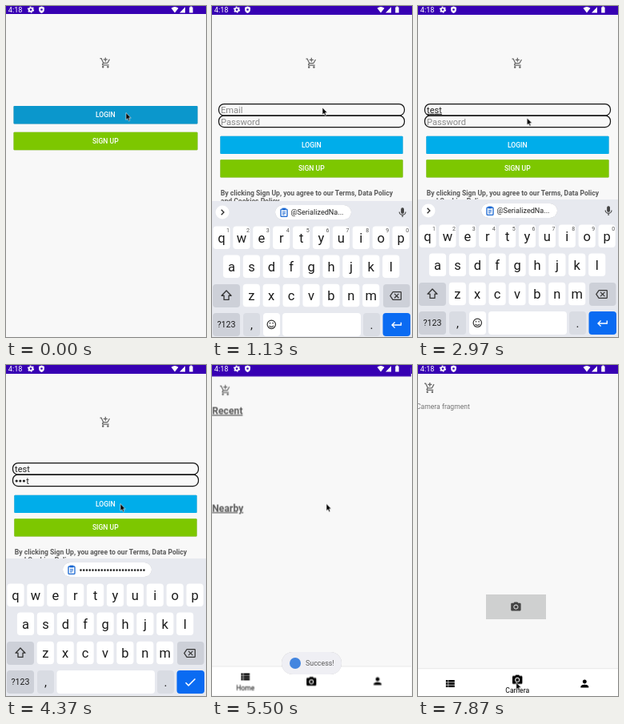
Recreate the animation shown at these times as an HTML page. Size 250 by 414 pixels, loop 8 s.

```html
<!DOCTYPE html>
<html lang="en">
<head>
<meta charset="utf-8">
<title>Shopping app login</title>
<style>
html, body { margin: 0; width: 100%; height: 100%; overflow: hidden; background: #f8f8f8; }
svg { display: block; width: 100%; height: 100%; }
text { font-family: Roboto, "Open Sans", sans-serif; white-space: pre; }
.mid { text-anchor: middle; }
.btn { font-size: 8.6px; font-weight: 500; fill: #fff; text-anchor: middle; }
.field { fill: none; stroke: #111; stroke-width: 1.2; }
.input { font-size: 11.1px; fill: #222; }
.hint { fill: #8a8a8a; }
.bold { font-weight: 700; fill: #5a5a5a; }
.small { font-size: 8.6px; }
.head { font-size: 12.4px; text-decoration: underline; }
.lift { filter: drop-shadow(0 .6px .6px #0004); }

/* one loop = 8 s, so 1% = 80 ms */
.run, .step { animation: 8s linear infinite; }
.step { animation-timing-function: step-end; }

.login { animation-name: openLogin, fadeLogin; transform-origin: 125px 207px; }
.home { animation-name: openHome, fadeHome; transform-origin: 125px 207px; }
@keyframes openLogin {
  0%, .19% { transform: scale(.85); animation-timing-function: linear(0, .4 16.7%, .73 24%, .86 32%, .95 50%, .985 70%, 1); }
  5.19%, 100% { transform: none; }
}
@keyframes fadeLogin { 0%, .4% { opacity: 0; } 1.1%, 100% { opacity: 1; } }
@keyframes openHome {
  0%, 66.87% { transform: scale(.85); animation-timing-function: linear(0, .4 16.7%, .73 24%, .86 32%, .95 50%, .985 70%, 1); }
  71.87%, 100% { transform: none; }
}
@keyframes fadeHome { 0%, 67.3% { opacity: 0; } 67.9%, 100% { opacity: 1; } }

.press { animation-name: press; }
@keyframes press { 0%, 61.2% { fill: #00adea; } 63%, 100% { fill: #0b97cc; } }

.keyboard { animation-name: keyboard; }
@keyframes keyboard {
  0%, 11.2% { transform: translateY(174px); animation-timing-function: ease-out; }
  14.4%, 66% { transform: none; animation-timing-function: ease-in; }
  67.8%, 100% { transform: translateY(174px); }
}
.kText { animation-name: kText; }
.kPass { animation-name: kPass; }
@keyframes kText { 0% { visibility: visible; } 40%, 100% { visibility: hidden; } }
@keyframes kPass { 0% { visibility: hidden; } 40%, 100% { visibility: visible; } }

.hintE { animation-name: hintE; }
.hintP { animation-name: hintP; }
@keyframes hintE { 0% { visibility: visible; } 22.5%, 100% { visibility: hidden; } }
@keyframes hintP { 0% { visibility: visible; } 43.7%, 100% { visibility: hidden; } }

.e1, .e2, .e3, .e4 { text-decoration: underline; }
.e1 { animation-name: e1, line; }
.e2 { animation-name: e2, line; }
.e3 { animation-name: e3, line; }
.e4 { animation-name: e4, line; }
@keyframes e1 { 0% { visibility: hidden; } 22.5%, 100% { visibility: visible; } }
@keyframes e2 { 0% { visibility: hidden; } 24.4%, 100% { visibility: visible; } }
@keyframes e3 { 0% { visibility: hidden; } 26.3%, 100% { visibility: visible; } }
@keyframes e4 { 0% { visibility: hidden; } 28.7%, 100% { visibility: visible; } }
@keyframes line { 0% { text-decoration-line: underline; } 39.5%, 100% { text-decoration-line: none; } }

.last { animation-name: last; }
@keyframes last {
  0% { visibility: hidden; transform: none; }
  43.7% { visibility: visible; transform: none; }
  45.6% { visibility: visible; transform: translateX(4.6px); }
  47.5% { visibility: visible; transform: translateX(9.2px); }
  50%, 100% { visibility: visible; transform: translateX(13.8px); }
}
.d1 { animation-name: d1; }
.d2 { animation-name: d2; }
.d3 { animation-name: d3; }
@keyframes d1 { 0% { visibility: hidden; } 45.6%, 100% { visibility: visible; } }
@keyframes d2 { 0% { visibility: hidden; } 47.5%, 100% { visibility: visible; } }
@keyframes d3 { 0% { visibility: hidden; } 50%, 100% { visibility: visible; } }

.tabA { animation-name: tabA; }
.tabB { animation-name: tabB; }
@keyframes tabA { 0% { visibility: visible; } 90%, 100% { visibility: hidden; } }
@keyframes tabB { 0% { visibility: hidden; } 90%, 100% { visibility: visible; } }
.sink { animation-name: sink; }
.rise { animation-name: rise; }
@keyframes sink { 0%, 90% { transform: none; } 91.4%, 100% { transform: translateY(5.5px); } }
@keyframes rise { 0%, 90% { transform: translateY(5.5px); } 91.4%, 100% { transform: none; } }

.toast { animation-name: toast; }
@keyframes toast { 0%, 66.6% { opacity: 0; } 68.1%, 91.9% { opacity: 1; } 93.7%, 100% { opacity: 0; } }

.pointer { animation-name: pointer; }
@keyframes pointer {
  0%, 5% { transform: translate(150px, 133.5px); animation-timing-function: ease-in-out; }
  9%, 31.5% { transform: translate(138px, 127px); animation-timing-function: ease-in-out; }
  36.5%, 51% { transform: translate(136.3px, 140px); animation-timing-function: ease-in-out; }
  54%, 73.4% { transform: translate(143px, 173.5px); animation-timing-function: ease-in-out; }
  79.1%, 83.4% { transform: translate(117.5px, 390px); }
  84.6%, 87.1% { transform: translate(117.5px, 403px); animation-timing-function: ease-out; }
  89.5%, 100% { transform: translate(122.7px, 397px); }
}
</style>
</head>
<body>
<svg viewBox="0 0 250 414" preserveAspectRatio="none">
  <defs>
    <path id="cart" transform="scale(.62) translate(-11.5 -11.5)" d="M11 9h2V6h3V4h-3V1h-2v3H8v2h3v3zm-4 9c-1.1 0-2 .9-2 2s.9 2 2 2 2-.9 2-2-.9-2-2-2zm10 0c-1.1 0-2 .9-2 2s.9 2 2 2 2-.9 2-2-.9-2-2-2zm-9.83-3.25l.03-.12.9-1.63h7.45c.75 0 1.41-.41 1.75-1.03l3.86-7.01L19.42 4h-.01l-1.1 2-2.76 5H8.53l-.13-.27L6.16 6l-.95-2-.94-2H1v2h2l3.6 7.59-1.35 2.45c-.16.28-.25.61-.25.96 0 1.1.9 2 2 2h12v-2H7.42c-.13 0-.25-.11-.25-.25z"/>
    <g id="camera" transform="scale(.62) translate(-12 -11)">
      <circle cx="12" cy="12" r="3.2"/>
      <path d="M9 2L7.17 4H4c-1.1 0-2 .9-2 2v12c0 1.1.9 2 2 2h16c1.1 0 2-.9 2-2V6c0-1.1-.9-2-2-2h-3.17L15 2H9zm3 15c-2.76 0-5-2.24-5-5s2.24-5 5-5 5 2.24 5 5-2.24 5-5 5z"/>
    </g>
    <path id="person" transform="scale(.62) translate(-12 -12)" d="M12 12c2.21 0 4-1.79 4-4s-1.79-4-4-4-4 1.79-4 4 1.79 4 4 4zm0 2c-2.67 0-8 1.34-8 4v2h16v-2c0-2.66-5.33-4-8-4z"/>
    <path id="list" transform="scale(.64) translate(-12.5 -12)" d="M4 14h4v-4H4v4zm0 5h4v-4H4v4zM4 9h4V5H4v4zm5 5h12v-4H9v4zm0 5h12v-4H9v4zM9 5v4h12V5H9z"/>
    <g id="clip">
      <rect x="-4" y="-4" width="8" height="9.4" rx="1" fill="none" stroke="#1967d2" stroke-width="1.3"/>
      <path d="M-2.2-5.4h4.4v2.8h-4.4z" fill="#1967d2"/>
      <path d="M-2-.4h4M-2 1.3h4M-2 3h2.6" stroke="#1967d2" stroke-width=".9"/>
    </g>
    <g id="page">
      <rect x="-3" width="254" height="416" fill="#f8f8f8"/>
      <rect x="-3" width="254" height="11" fill="#3700b3"/>
    </g>
  </defs>

  <g>
    <rect width="250" height="414" fill="#f8f8f8"/>
    <rect width="250" height="10" fill="#3700b3"/>
    <use href="#cart" x="124" y="71" fill="#666"/>
    <rect class="lift" x="9.5" y="125" width="230" height="22.4" rx="1" fill="#0b97cc"/>
    <rect class="lift" x="9.5" y="157.8" width="230" height="22.4" rx="1" fill="#7dc700"/>
    <text class="btn" x="124.3" y="139.4">LOGIN</text>
    <text class="btn" x="124.3" y="172.2">SIGN UP</text>
  </g>

  <g class="run login">
    <use href="#page"/>
    <use href="#cart" x="124" y="71.3" fill="#666"/>
    <rect class="field" x="8.5" y="122.6" width="232" height="14.5" rx="6.5"/>
    <rect class="field" x="8.5" y="137.1" width="232" height="14.5" rx="6.5"/>
    <text class="input hint step hintE" x="11" y="134">Email</text>
    <text class="input hint step hintP" x="11" y="148.6">Password</text>
    <text class="input" x="11" y="133.8"><tspan class="step e1">t</tspan><tspan class="step e2">e</tspan><tspan class="step e3">s</tspan><tspan class="step e4">t</tspan></text>
    <g fill="#222">
      <circle class="step d1" cx="13.2" cy="145" r="1.6"/>
      <circle class="step d2" cx="17.8" cy="145" r="1.6"/>
      <circle class="step d3" cx="22.4" cy="145" r="1.6"/>
      <text class="input step last" x="11.4" y="148.6">t</text>
    </g>
    <g class="lift">
      <rect class="run press" x="10.3" y="162.8" width="228.3" height="22.2" rx="1" fill="#00adea"/>
      <rect x="10.3" y="192.2" width="228.3" height="22.2" rx="1" fill="#7dc700"/>
    </g>
    <text class="btn" x="124.3" y="177">LOGIN</text>
    <text class="btn" x="124.3" y="206.4">SIGN UP</text>
    <text class="bold small" x="10.8" y="236.8">By clicking Sign Up, you agree to our Terms, Data Policy</text>
    <text class="bold small" x="10.8" y="246.8">and Cookies Policy.</text>
  </g>

  <g class="run home">
    <use href="#page"/>
    <use href="#cart" x="14.5" y="28.5" fill="#666"/>
    <g class="step tabA">
      <text class="bold head" x="-2" y="58.8">Recent</text>
      <text class="bold head" x="-2" y="182.6">Nearby</text>
    </g>
    <g class="step tabB">
      <text class="small" x="-2" y="55.2" fill="#757575">Camera fragment</text>
      <rect class="lift" x="85" y="287" width="75" height="31" rx="1" fill="#cfd0d0"/>
      <use href="#camera" x="122.4" y="302" fill="#444"/>
    </g>
    <rect x="-3" y="380" width="254" height="36" fill="#fff"/>
    <rect x="-3" y="379.4" width="254" height=".8" fill="#e4e4e4"/>
    <g class="run sink"><use href="#list" x="40.3" y="393"/></g>
    <g class="run rise"><use href="#camera" x="124.2" y="393.2"/></g>
    <use href="#person" x="208.3" y="398.5"/>
    <text class="small mid step tabA" x="40.3" y="410">Home</text>
    <text class="small mid step tabB" x="124.2" y="410">Camera</text>
  </g>

  <g class="run keyboard">
    <rect y="242" width="250" height="174" fill="#e7e9ef"/>
    <g id="keys"></g>
    <g class="step kText">
      <g id="digits" class="mid" font-size="7" fill="#555"></g>
      <circle cx="13" cy="256" r="8.5" fill="#fff"/>
      <path d="M11.6 252.8l3.2 3.2-3.2 3.2" fill="none" stroke="#333" stroke-width="1.4"/>
      <rect class="lift" x="79" y="247" width="95" height="18" rx="9" fill="#fff"/>
      <use href="#clip" x="90" y="256"/>
      <text x="98.4" y="259.4" font-size="9.1" fill="#222">@SerializedNa...</text>
      <g fill="none" stroke="#444" stroke-width="1.2">
        <rect x="236.8" y="250.8" width="2.6" height="6.4" rx="1.3" fill="#444"/>
        <path d="M234.2 255.4a3.9 3.9 0 0 0 7.8 0M238.1 259.3v2.6"/>
      </g>
      <rect x="64" y="382" width="21" height="29" rx="4" fill="#fff"/>
      <rect x="88" y="382" width="98" height="29" rx="4" fill="#fff"/>
      <g fill="none" stroke="#333" stroke-width="1.2">
        <circle cx="74.3" cy="396.3" r="5.2"/>
        <path d="M71.5 397.8q2.8 3.2 5.6 0M72.5 393.8v1.6M76.1 393.8v1.6"/>
      </g>
      <path transform="translate(230.5 397) scale(.68) translate(-11.5 -12)" fill="#fff" d="M19 7v4H5.83l3.58-3.59L8 6l-6 6 6 6 1.41-1.41L5.83 13H21V7z"/>
    </g>
    <g class="step kPass">
      <rect class="lift" x="71" y="247" width="111" height="18" rx="9" fill="#fff"/>
      <use href="#clip" x="82" y="256"/>
      <path d="M93.5 256.6h79.5" stroke="#222" stroke-width="2.6" stroke-linecap="round" stroke-dasharray="0 3.76"/>
      <rect x="63.5" y="382" width="122.5" height="29" rx="4" fill="#fff"/>
      <path transform="translate(230.5 397) scale(.74) translate(-12.2 -12.3)" fill="#fff" d="M9 16.17L4.83 12l-1.42 1.41L9 19 21 7l-1.41-1.41z"/>
    </g>
    <path d="M18 354l6 6.2h-3v5.2h-6v-5.2h-3z" fill="none" stroke="#333" stroke-width="1.3" stroke-linejoin="round"/>
    <path transform="translate(229.5 360.5) scale(.62) translate(-12 -12)" fill="#333" d="M22 3H7c-.69 0-1.23.35-1.59.88L0 12l5.41 8.11c.36.53.9.89 1.59.89h15c1.1 0 2-.9 2-2V5c0-1.1-.9-2-2-2zm0 16H7.07L2.4 12l4.66-7H22v14zm-11.59-2L14 13.41 17.59 17 19 15.59 15.41 12 19 8.41 17.59 7 14 10.59 10.41 7 9 8.41 12.59 12 9 15.59z"/>
  </g>

  <g class="run toast">
    <rect class="lift" x="87" y="359" width="75" height="28" rx="14" fill="#efeff4"/>
    <circle cx="104" cy="373" r="7" fill="#4385df"/>
    <text x="117" y="376.2" font-size="8.9" fill="#5c5c5c">Success!</text>
  </g>

  <g fill="#fff">
    <text x="2.8" y="8" font-size="9.2">4:18</text>
    <circle cx="31" cy="4.6" r="2.3" fill="none" stroke="#fff" stroke-width="1.8"/>
    <circle cx="31" cy="4.6" r="3.6" fill="none" stroke="#fff" stroke-width="1.1" stroke-dasharray="1.885"/>
    <path d="M44.5.4l3.4 1.4v2.6q0 3.2-3.4 4.6-3.4-1.4-3.4-4.6V1.8z"/>
    <circle cx="44.5" cy="4.5" r="1.3" fill="#3700b3"/>
    <path d="M211 8.6L206.5 2.8q4.5-3.4 9 0zM217 8.4h7V1.2zM229.2 1.6h1.2v-1h2v1h1.2v7h-4.4z"/>
  </g>

  <g class="run pointer">
    <path d="M0 0V9L2 7.2 3.4 10.2 4.9 9.5 3.5 6.6H6.2Z" fill="#000" stroke="#fff" stroke-width=".6"/>
  </g>
</svg>
<script>
const key = (x, y, w, fill, h = 29) =>
  `<rect x="${x}" y="${y}" width="${w}" height="${h}" rx="4" fill="${fill}"/>`;
const label = (x, y, s, size = 16.5) =>
  `<text class="mid" x="${x}" y="${y}" font-size="${size}" fill="#1b1b1b">${s}</text>`;

const rows = [["qwertyuiop", 12, 273.5, 294], ["asdfghjkl", 24.5, 309.5, 329.5], ["zxcvbnm", 49.3, 345.8, 365.6]];
const pitch = 24.9, grey = "#cdd0d8", pale = "#d9dce3";
let keys = "";
for (const [letters, x0, top, base] of rows)
  [...letters].forEach((c, i) => {
    const x = x0 + i * pitch;
    keys += key(x - 10.6, top, 21.2, "#fff", 28.5) + label(x, base, c);
  });

keys += key(1, 346, 34, grey) + key(214, 346, 33.5, grey)
  + key(1, 382, 34, grey) + key(39, 382, 21, pale) + key(189, 382, 21, pale)
  + key(213.5, 382, 34.5, "#0a6bf2")
  + label(18, 400, "?123", 10.6) + label(49.5, 402, ",", 15) + label(199.5, 402, ".", 15);
document.getElementById("keys").innerHTML = keys;

document.getElementById("digits").innerHTML = [..."1234567890"]
  .map((d, i) => `<text x="${20 + i * pitch}" y="281.3">${d}</text>`).join("");
</script>
</body>
</html>
```
